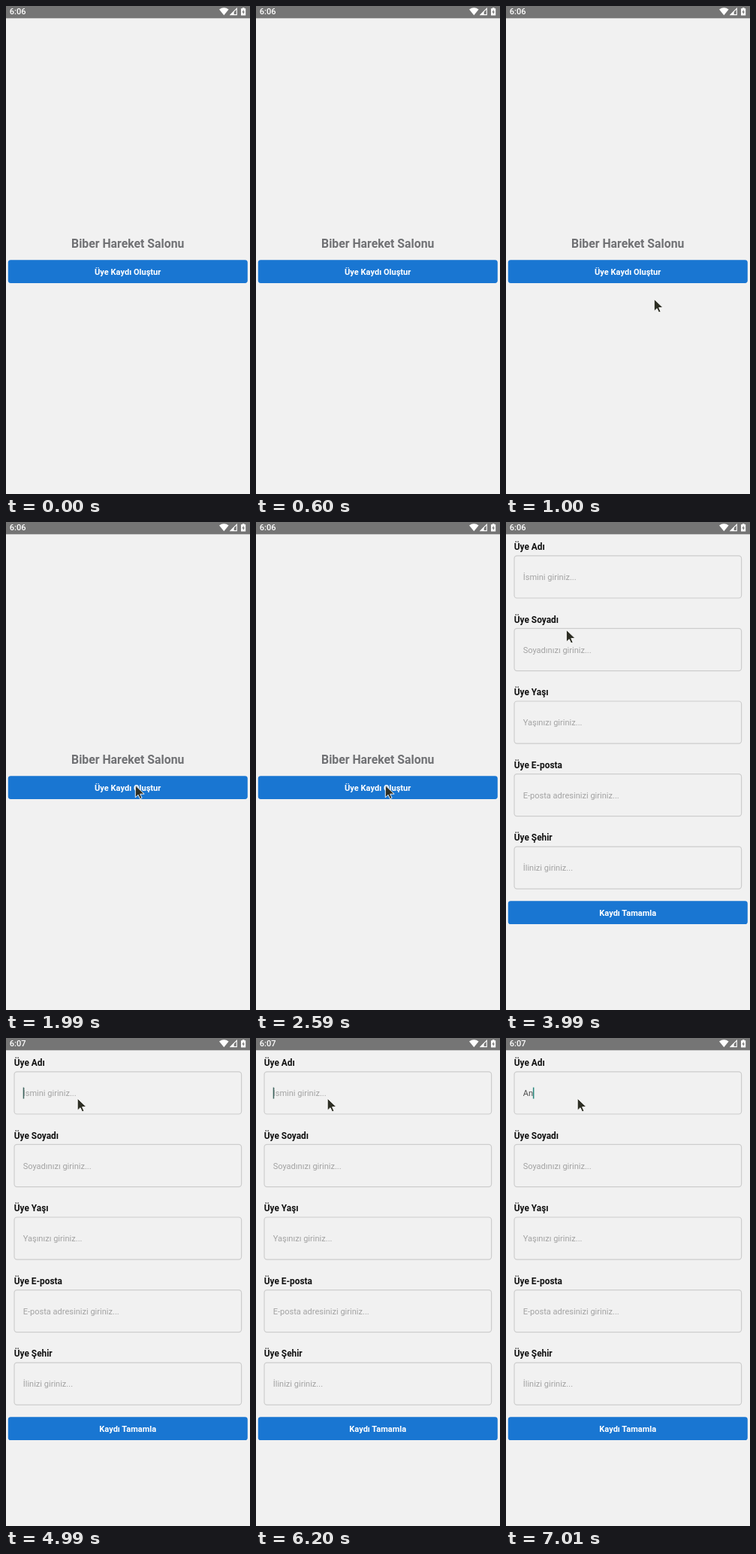
Write an HTML page that moves like this. It is 325x648 px and loops after 8 s.

```html
<!DOCTYPE html>
<html lang="tr">
<head>
<meta charset="utf-8">
<title>Üye kaydı</title>
<style>
  html, body { margin: 0; width: 100%; height: 100%; overflow: hidden; background: #f1f1f1; }
  svg { display: block; width: 100%; height: 100%; font-family: Roboto, sans-serif; font-size: 11.06px; }
  .title { font-size: 15.8px; font-weight: 700; fill: #707174; text-anchor: middle; }
  .button rect { fill: #1976d2; }
  .button text { fill: #fff; font-weight: 700; text-anchor: middle; }
  .label { font-size: 11.86px; font-weight: 700; fill: #111; }
  .box { fill: none; stroke: #cdcdcd; stroke-width: 1.2; }
  .hint { fill: #a3a3a3; }
  .typed { fill: #4c4c4c; }
  .clock { font-weight: 500; fill: #fff; }
</style>
</head>
<body>
<svg viewBox="0 0 325 648">
  <rect width="325" height="648" fill="#f1f1f1"/>

  <rect width="325" height="16.3" fill="#757575"/>
  <text id="clock" class="clock" x="4.8" y="11.3"></text>
  <g fill="#fff">
    <path d="M290.3 12.2 284 4.6Q290.3 -.2 296.6 4.6Z"/>
    <path d="M307.3 3.4V11.6H299.1Z" fill="none" stroke="#fff" stroke-width="1.1"/>
    <path d="M298.2 12.1 303.6 6.7V12.1Z"/>
    <path d="M314.9 2.2h2.6v1.1h1.7v9.2h-6.2V3.3h1.9Z"/>
    <path d="M316.6 4.7 314.3 8.4H315.8V11.1L318 7.4H316.6Z" fill="#757575"/>
  </g>

  <g id="home">
    <text class="title" x="162.2" y="320.8">Biber Hareket Salonu</text>
  </g>
  <g id="form"></g>
  <rect id="caret" y="65.6" width="1.5" height="15"/>
  <path id="pointer" d="M0 0V16L3.8 12.5 6.3 17.8 8.8 16.7 6.4 11.4H11.8Z" stroke="#fff" stroke-width=".9"/>
</svg>
<script>
const $ = id => document.getElementById(id);
const LOOP = 8000;

const fields = [
  ["Üye Adı", "İsmini giriniz..."],
  ["Üye Soyadı", "Soyadınızı giriniz..."],
  ["Üye Yaşı", "Yaşınızı giriniz..."],
  ["Üye E-posta", "E-posta adresinizi giriniz..."],
  ["Üye Şehir", "İlinizi giriniz..."]
];

const button = (y, text) => `<g class="button">
  <rect x="2.8" y="${y}" width="319" height="30.8" rx="3.4"/>
  <text x="162.2" y="${y + 19.8}">${text}</text></g>`;

const field = ([label, hint], i) => `<g transform="translate(0 ${i * 96.55})">
  <text class="label" x="10.8" y="37.3">${label}</text>
  <rect class="box" x="11" y="44.9" width="302.6" height="56.1" rx="3.6"/>
  <text class="hint" x="22.7" y="77.2">${hint}</text></g>`;

$("home").insertAdjacentHTML("beforeend", button(337.2, "Üye Kaydı Oluştur"));
$("form").innerHTML = fields.map(field).join("") + button(503.3, "Kaydı Tamamla");
const homeButton = $("home").querySelector(".button");
const firstInput = $("form").querySelector(".hint");

const DARK = "#2d2e24";
const steps = [
  { at: 0 },
  { at: 1000, pointer: [197.3, 389.2] },
  { at: 1990, pointer: [172.3, 349.8] },
  { at: 2990, pointer: [168.4, 352.8], pressed: true },
  { at: 3990, pointer: [80.4, 143.2], form: true },
  { at: 4990, pointer: [95.2, 80.2], form: true, clock: "6:07", caret: [22.7, "#3f6660"] },
  { at: 7010, pointer: [95.2, 80.2], form: true, clock: "6:07", caret: [35.9, "#26877c"], typed: "An" }
];

const show = (el, on) => { el.style.display = on ? "" : "none"; };

function render({ pointer, pressed, form, clock = "6:06", caret, typed }) {
  $("clock").textContent = clock;
  show($("home"), !form);
  show($("form"), form);
  homeButton.setAttribute("opacity", pressed ? 0.2 : 1);
  firstInput.textContent = typed || fields[0][1];
  firstInput.setAttribute("class", typed ? "typed" : "hint");
  show($("caret"), caret);
  if (caret) {
    $("caret").setAttribute("x", caret[0]);
    $("caret").setAttribute("fill", caret[1]);
  }
  show($("pointer"), pointer);
  if (pointer) {
    $("pointer").setAttribute("transform", `translate(${pointer})`);
    $("pointer").setAttribute("fill", pressed ? "#626462" : DARK);
  }
}

const start = performance.now();
let current;
function tick(now) {
  const t = Math.max(0, now - start) % LOOP;
  const step = steps.findLast(s => s.at <= t);
  if (step !== current) render(current = step);
  requestAnimationFrame(tick);
}
tick(start);
</script>
</body>
</html>
```
